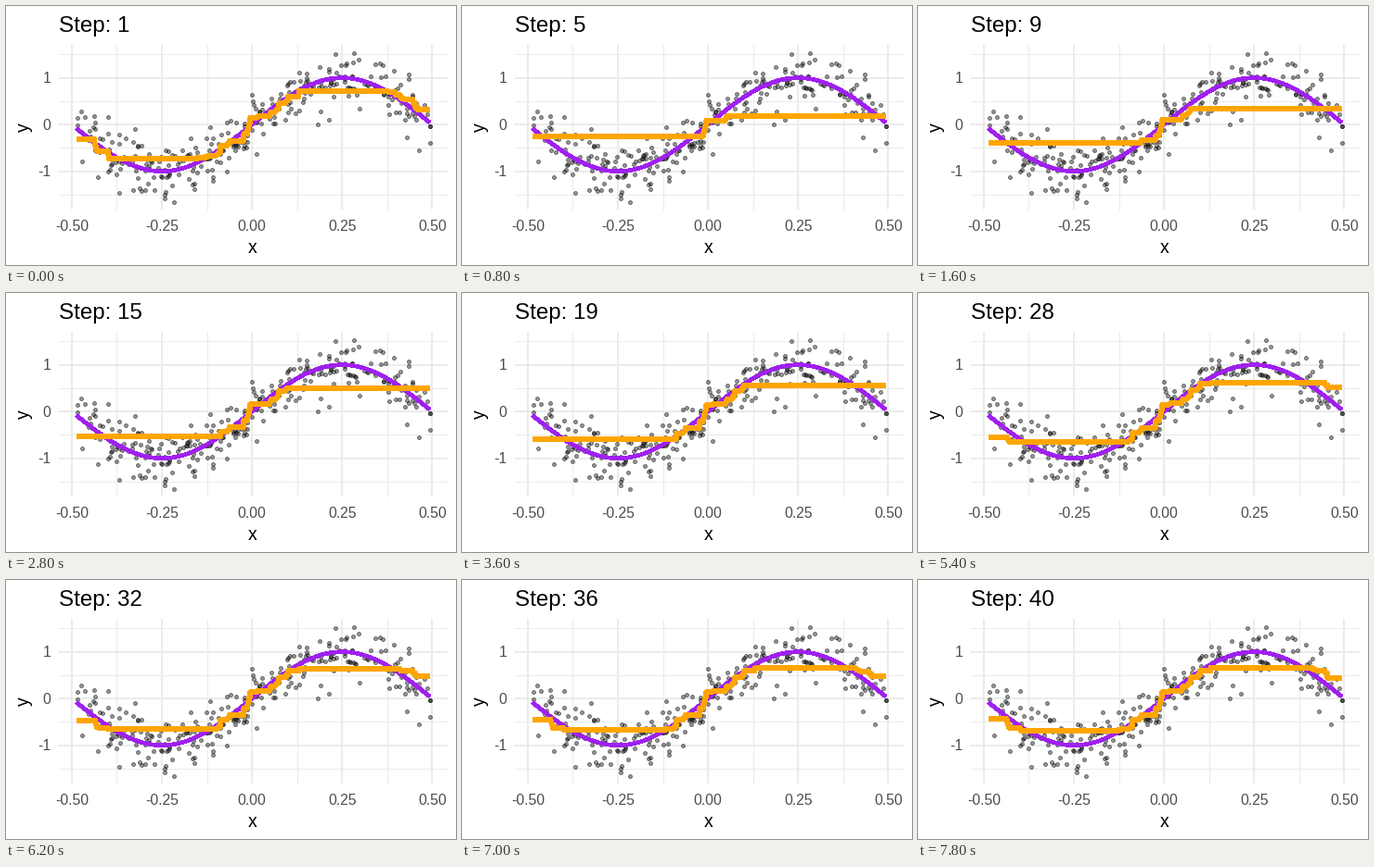
Recreate the animation shown at these times as a matplotlib script. Size 485 by 280 pixels, loop 8 s.

```python
import math

import numpy as np
import matplotlib.pyplot as plt
from matplotlib.animation import FuncAnimation

W, H, DPI = 485, 280, 80
PT = 72 / DPI  # points per pixel
FRAMES, INTERVAL = 40, 200
LEFT, RIGHT, TOP, BOTTOM = 57, 475.5, 42, 220
FONT = "Liberation Sans"

N, NOISE = 300, 0.3
ROUNDS, RATE, MIN_LEAF = 60, 0.1, 7


def uniforms(seed, n):
    """Mersenne Twister draws, state filled by a linear congruential scramble."""
    state = []
    for i in range(50 + 625):
        seed = (69069 * seed + 1) % 2**32
        if i > 50:
            state.append(seed)
    gen = np.random.RandomState()
    gen.set_state(("MT19937", np.array(state, dtype=np.uint32), 624))
    return gen.randint(0, 2**32, n, dtype=np.uint32) / 2**32


def normal_quantile(p):
    z = np.linspace(-5, 5, 4001)
    cdf = [0.5 * (1 + math.erf(v / math.sqrt(2))) for v in z]
    return np.interp(p, cdf, z)


def sample():
    """Noisy sine, sorted by x."""
    u = uniforms(1, 3 * N)
    x = u[:N] - 0.5
    big = 2**27
    noise = normal_quantile((np.floor(big * u[N::2]) + u[N + 1::2]) / big)
    y = np.sin(2 * np.pi * x) + NOISE * noise
    order = np.argsort(x)
    return x[order], y[order]


def stump(res):
    """Best single split of the residuals into two constant parts."""
    k = np.arange(MIN_LEAF, N - MIN_LEAF + 1)
    excess = np.cumsum(res - res.mean())[k - 1]
    cut = k[np.argmax(excess**2 / (k * (N - k)))]
    return np.where(np.arange(N) < cut, res[:cut].mean(), res[cut:].mean())


def boost(y):
    fits = [np.full(N, y.mean())]
    for _ in range(ROUNDS):
        fits.append(fits[-1] + RATE * stump(y - fits[-1]))
    return fits


def scale(data, start, end):
    """Map data to pixels with a margin of 5% of the range on each side."""
    low, span = data.min(), np.ptp(data)
    return lambda v: start + (end - start) * ((np.asarray(v) - low) / span
                                              + 0.05) / 1.1


xs, ys = sample()
fits = boost(ys)
px = scale(xs, LEFT, RIGHT)
py = scale(ys, BOTTOM, TOP)

fig = plt.figure(figsize=(W / DPI, H / DPI), dpi=DPI, facecolor="white")
ax = fig.add_axes([0, 0, 1, 1])
ax.set_xlim(0, W)
ax.set_ylim(H, 0)
ax.axis("off")


def line(x, y, color, width, z):
    return ax.plot(x, y, color=color, lw=width * PT, zorder=z,
                   antialiased=False, solid_capstyle="butt",
                   solid_joinstyle="round")[0]


def label(x, y, text, size, color="black", **kw):
    return ax.text(x, y, text, fontsize=size * PT, color=color, family=FONT,
                   va="baseline", **kw)


# Grid: every second line is a thicker one
for i in range(-4, 5):
    line([px(i / 8)] * 2, [TOP, BOTTOM], "#ebebeb", 1 if i % 2 else 2, 1)
for i in range(-3, 4):
    line([LEFT, RIGHT], [py(i / 2)] * 2, "#ebebeb", 1 if i % 2 else 2, 1)

ax.scatter(np.floor(px(xs)) + 0.5, np.floor(py(ys)) + 0.5, s=(4 * PT) ** 2,
           facecolor=(0, 0, 0, 0.4), edgecolor=(0, 0, 0, 0.45),
           linewidth=PT, antialiased=False, zorder=2)

line(px(xs), py(np.sin(2 * np.pi * xs)), "#a020f0", 3.6, 3)
fit = line([], [], "#ffa500", 5, 4)

for i in range(-2, 3):
    label(px(i / 4), 243, f"{i / 4:.2f}", 15.7, "#4d4d4d", ha="center")
for i in (-1, 0, 1):
    label(48.5, py(i) + 5.7, str(i), 15.7, "#4d4d4d", ha="right")
label(265.5, 266.8, "x", 19.5, ha="center")
label(24.5, 131.5, "y", 19.5, ha="center", rotation=90,
      rotation_mode="anchor")
title = label(LEFT, 28, "", 24.2, ha="left")


def update(frame):
    title.set_text(f"Step: {frame + 1}")
    # The loop opens on the fully grown fit
    fit.set_data(px(xs), py(fits[frame or -1]))
    return title, fit


anim = FuncAnimation(fig, update, frames=FRAMES, interval=INTERVAL,
                     repeat=True, repeat_delay=0, blit=False)
plt.show()
```
